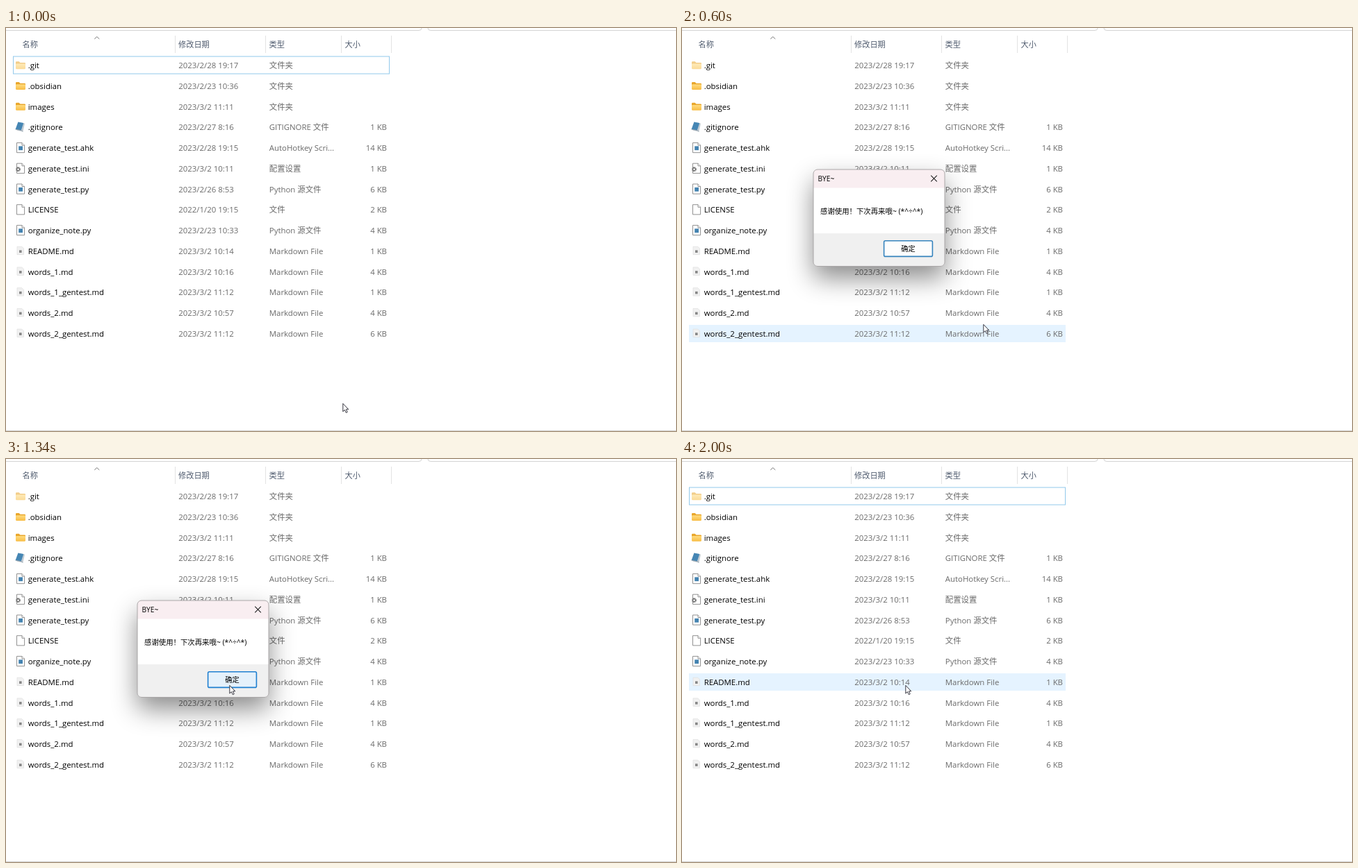
An HTML page that plays this animation: 964 by 581 pixels, repeating every 2130 ms.

```html
<!DOCTYPE html>
<html lang="zh-CN">
<head>
<meta charset="utf-8">
<title>文件列表</title>
<style>
  html, body { margin: 0; width: 100%; height: 100%; overflow: hidden; background: #fff; }
  svg { display: block; width: 964px; height: 581px; }
  text { font: 11.4px "Open Sans", "Noto Sans CJK SC", "Noto Sans CJK", sans-serif; fill: #6a6a6a; white-space: pre; }
  .name { fill: #000; }
  .head text { font-size: 11.2px; fill: #4f5b6e; }
  .size { text-anchor: end; }
  .rule { stroke: #e3e3e3; }
  .edge { stroke: #d4d4d4; }
  .page { fill: #fff; stroke: #858585; stroke-width: .9; }
  #dialog { transform-origin: 283.5px 273.5px; }
  #dialog text { font-size: 10.2px; fill: #000; }
  #dialog .note { font-size: 10.4px; }
  #button { fill: #fdfdfd; stroke: #3583bd; stroke-width: 1.6; }
  #button.hover { fill: #e5f1fb; stroke: #1f7fd0; }
  #button.down { fill: #dcebf7; stroke: #1f7fd0; }
</style>
</head>
<body>
<svg viewBox="0 0 964 581">
  <defs>
    <filter id="shadow" x="-60%" y="-70%" width="220%" height="260%">
      <feDropShadow dx="0" dy="17" stdDeviation="18" flood-color="#000" flood-opacity=".45"/>
    </filter>
    <linearGradient id="amber" x2="0" y2="1">
      <stop stop-color="#ffdc80"/><stop offset="1" stop-color="#f8bd45"/>
    </linearGradient>
    <g id="folder">
      <path d="M14 -4.5q0 -1.2 1.2 -1.2h3.6l1.6 1.6h6.4q1.2 0 1.2 1.2v3h-14z" fill="#e9a62b"/>
      <rect x="14" y="-2.6" width="14" height="7.8" rx="1.1" fill="url(#amber)"/>
    </g>
    <g id="page">
      <path class="page" d="M15.5 -7.5h7.5l3.6 3.6v10.6h-11.1z"/>
      <path class="page" d="M23 -7.5v3.6h3.6" fill="none"/>
    </g>
    <g id="book">
      <path d="M18 -7.5l9 1.7 -2.6 12 -9 -2z" fill="#c3ccd3"/>
      <path d="M17.4 -7.6l7.8 1.4 -3.4 10.6 -8.2 -1.6z" fill="#4586b4"/>
      <path d="M13.6 2.8l8.2 1.6 2.6 1.8" fill="none" stroke="#8b98a3" stroke-width=".8"/>
    </g>
    <g id="mark"><use href="#page"/><rect x="18.2" y="-2.6" width="5.8" height="5.8" fill="#4483b0"/></g>
    <g id="gear">
      <use href="#page"/>
      <circle cx="17.5" cy="1" r="2.5" fill="#fff" stroke="#666" stroke-width="1.7" stroke-dasharray="1.4 .56"/>
      <circle cx="17.5" cy="1" r="1.8" fill="none" stroke="#666" stroke-width="1"/>
    </g>
    <g id="note">
      <path d="M16 -6.5h6.8l2.7 2.7v8.8h-9.5z" fill="#f1f1f1" stroke="#dedede" stroke-width=".7"/>
      <rect x="19" y="-1.3" width="3.6" height="3.6" fill="#858585"/>
    </g>
  </defs>

  <path class="edge" d="M0 3.5H594q4 0 4 -3.5M607 0q0 3.5 4 3.5H964M0 580.5H964" fill="none"/>
  <path class="rule" d="M243.5 11v25M373.5 11v25M482.5 11v25M554.5 11v25"/>
  <path d="M127.3 15.8l3.5 -3.2 3.5 3.2" fill="none" stroke="#777"/>
  <g class="head">
    <text x="23.5" y="27.6">名称</text><text x="248" y="27.6">修改日期</text>
    <text x="378.5" y="27.6">类型</text><text x="487.5" y="27.6">大小</text>
  </g>
  <rect id="hot" x="10" width="542" height="25" fill="#e5f3ff"/>
  <rect id="focus" x="10.5" y="41" width="541" height="25" fill="none" stroke="#92c9eb"/>
  <g id="rows"></g>

  <g id="dialog">
    <rect x="189" y="204" width="189" height="139.5" rx="6" fill="#fff" filter="url(#shadow)"/>
    <path d="M189 230.5V210q0 -6 6 -6H372q6 0 6 6V230.5z" fill="#f9eef1"/>
    <path d="M189 296H378V337.5q0 6 -6 6H195q-6 0 -6 -6z" fill="#f0f0f0"/>
    <rect x="189" y="204" width="189" height="139.5" rx="6" fill="none" stroke="#a3a0a1" stroke-width=".9"/>
    <text x="195.6" y="221">BYE~</text>
    <path d="M358.2 212.7l8.6 8.6m0 -8.6l-8.6 8.6" stroke="#222" stroke-width="1.1"/>
    <text class="note" x="199" y="267.8">感谢使用！下次再来哦~ (*^÷^*)</text>
    <rect id="button" x="290.6" y="306.8" width="69.8" height="22.6" rx="2"/>
    <text x="325.5" y="322.2" text-anchor="middle">确定</text>
  </g>
  <circle id="click" r="11" fill="#f5ec27" opacity=".68"/>
  <path id="cursor" d="M.8 .4V12l2.6 -2.4 1.9 4.1 1.9 -.9 -1.8 -4h3.4z" fill="#fff" stroke="#2b2b35" stroke-width=".95" stroke-linejoin="round"/>
</svg>
<script>
const LOOP = 2130, TOP = 54, STEP = 29.74;
const $ = id => document.getElementById(id);

const md = 'Markdown File', py = 'Python 源文件', dir = '文件夹';
const files = [
  ['folder', '.git', '2023/2/28 19:17', dir],
  ['folder', '.obsidian', '2023/2/23 10:36', dir],
  ['folder', 'images', '2023/3/2 11:11', dir],
  ['book', '.gitignore', '2023/2/27 8:16', 'GITIGNORE 文件', 1],
  ['mark', 'generate_test.ahk', '2023/2/28 19:15', 'AutoHotkey Scri...', 14],
  ['gear', 'generate_test.ini', '2023/3/2 10:11', '配置设置', 1],
  ['mark', 'generate_test.py', '2023/2/26 8:53', py, 6],
  ['page', 'LICENSE', '2022/1/20 19:15', '文件', 2],
  ['mark', 'organize_note.py', '2023/2/23 10:33', py, 4],
  ['note', 'README.md', '2023/3/2 10:14', md, 1],
  ['note', 'words_1.md', '2023/3/2 10:16', md, 4],
  ['note', 'words_1_gentest.md', '2023/3/2 11:12', md, 1],
  ['note', 'words_2.md', '2023/3/2 10:57', md, 4],
  ['note', 'words_2_gentest.md', '2023/3/2 11:12', md, 6]
];
$('rows').innerHTML = files.map(([icon, name, date, type, kb], i) => `
  <g transform="translate(0 ${TOP + i * STEP})">
    <use href="#${icon}" opacity="${i ? 1 : .55}"/>
    <text class="name" x="31.7" y="4.1">${name}</text>
    <text x="248.3" y="4.1">${date}</text>
    <text x="378.8" y="4.1">${type}</text>
    ${kb ? `<text class="size" x="548" y="4.1">${kb} KB</text>` : ''}
  </g>`).join('');

// Each track holds its value until the next time: [ms, ...values]
const path = [
  [0, 484, 541], [470, 482, 535], [540, 462, 481], [600, 433, 427], [670, 407, 395],
  [730, 385, 372], [800, 365, 352], [870, 350, 342], [940, 340, 336], [1010, 332, 332],
  [1080, 327, 330], [1140, 325, 329], [1210, 323, 328], [1270, 322, 327], [1340, 321, 326]
];
const fade = [ // opacity, scale
  [0, 0, 1], [280, .35, .93], [340, .85, .97], [400, 1, .987], [470, 1, 1],
  [1800, .9, .98], [1870, .35, .94], [1930, 0, 1]
];
const hover = [[0, -1], [600, 13], [670, 12], [730, 11], [800, 10], [870, -1], [1930, 9]];
const press = [[0, ''], [1140, 'hover'], [1740, 'down'], [1870, '']];

const at = (track, t) => track.findLast(key => key[0] <= t).slice(1);

function draw(t) {
  const [x, y] = at(path, t), [alpha, scale] = at(fade, t);
  const [row] = at(hover, t), [state] = at(press, t);
  $('cursor').setAttribute('transform', `translate(${x} ${y})`);
  $('click').setAttribute('transform', `translate(${x} ${y})`);
  $('click').style.display = state === 'down' ? '' : 'none';
  $('button').setAttribute('class', state);
  $('dialog').style.opacity = alpha;
  $('dialog').style.transform = `scale(${scale})`;
  $('focus').style.display = t < 280 || t >= 1870 ? '' : 'none';
  $('hot').style.display = row < 0 ? 'none' : '';
  $('hot').setAttribute('y', Math.round(TOP + row * STEP - 13));
}

let start;
function tick(now) {
  start ??= now;
  draw((now - start) % LOOP);
  requestAnimationFrame(tick);
}
draw(0);
requestAnimationFrame(tick);
</script>
</body>
</html>
```
